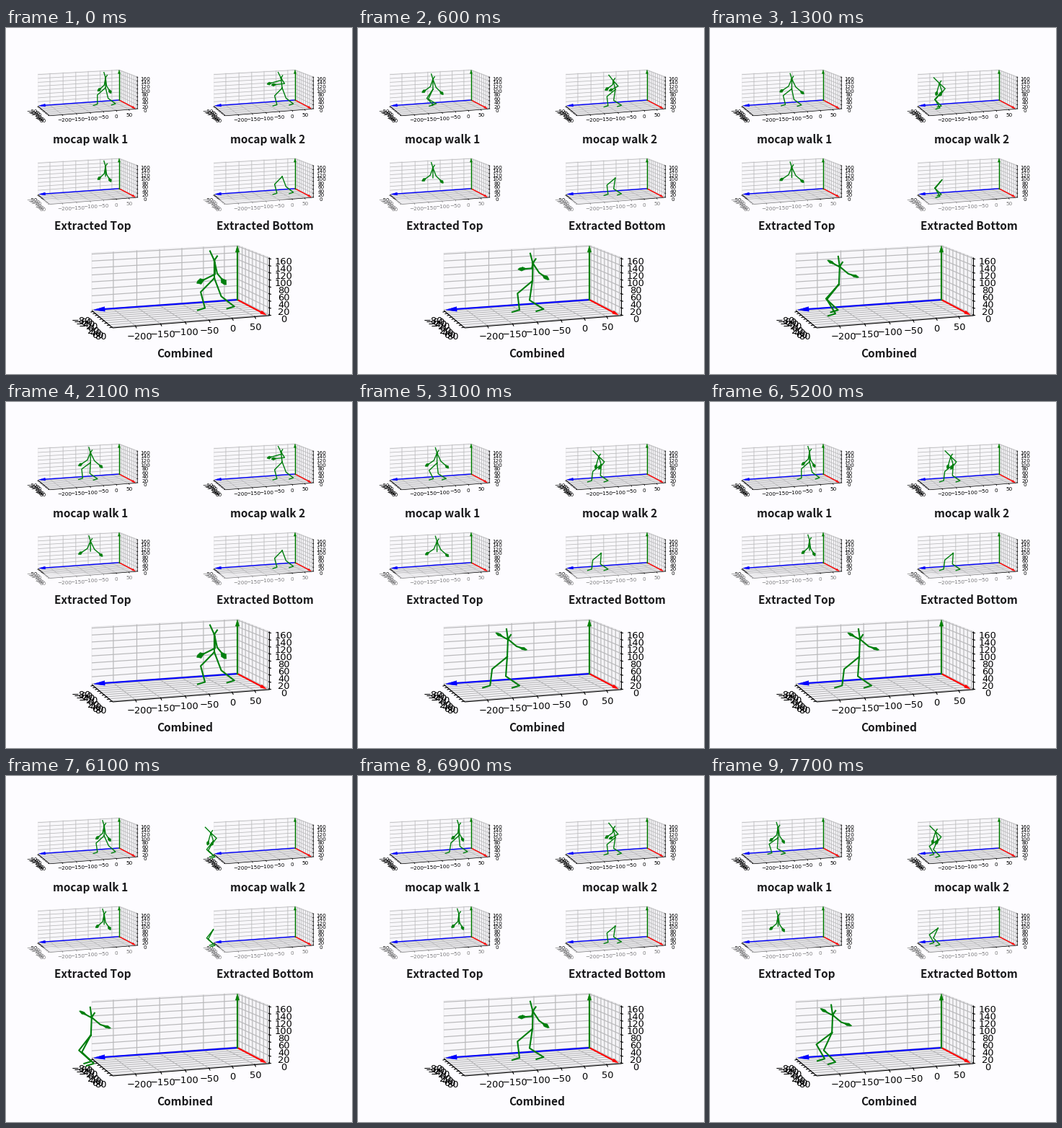
These frames come from a looping animation (480x480 px, 7800 ms). A matplotlib script:

```python
import numpy as np
import matplotlib.pyplot as plt
from matplotlib.animation import FuncAnimation
from matplotlib.collections import LineCollection
from matplotlib.patches import Polygon, Rectangle

SIZE, FRAMES, STEP_MS = 480, 78, 100
PX = 0.72  # points per pixel at 100 dpi
BG, GRID, GREEN = "#fdfcff", "#b9b9bb", "#007f0e"
SMALL = 0.558
ORIGIN = np.array([321.0, 377.0])

# Panels as (x, y, scale) of the axes' origin; all drawing uses the big panel's units.
BIG = (321, 377, 1.0)
WALK1, WALK2 = (157, 100, SMALL), (401, 100, SMALL)
TOP, BOTTOM = (157, 222.8, SMALL), (401, 222.8, SMALL)


def place(pt, panel):
    ox, oy, s = panel
    return np.array([ox, oy]) + (np.asarray(pt, float) - ORIGIN) * s


def mix(p, q, u):
    return p + (q - p) * u


# ---- axes -------------------------------------------------------------

fig = plt.figure(figsize=(SIZE / 100, SIZE / 100), dpi=100, facecolor=BG)
ax = fig.add_axes([0, 0, 1, 1])
ax.set_xlim(0, SIZE)
ax.set_ylim(SIZE, 0)
ax.axis("off")

BACK_L, BACK_R = np.array([119, 392]), np.array([321, 377])
FRONT_L, FRONT_R = np.array([148, 416]), np.array([365, 399])
TOP_L, TOP_R, TOP_F = np.array([119, 312]), np.array([321, 301]), np.array([365, 318])
PANES = [([BACK_L, BACK_R, TOP_R, TOP_L], "#f8f7fa"),
         ([BACK_R, FRONT_R, TOP_F, TOP_R], "#f5f4f7"),
         ([BACK_L, BACK_R, FRONT_R, FRONT_L], "#f6f5f8")]


def arrow(p, q, color, head, half, panel):
    d = (q - p) / np.hypot(*(q - p))
    n = np.array([-d[1], d[0]])
    base = q - d * head
    a, b = place(p, panel), place(base, panel)
    ax.plot([a[0], b[0]], [a[1], b[1]], color=color, lw=(0.5 + 1.6 * panel[2]) * PX, zorder=3)
    tri = [place(v, panel) for v in (q, base + n * half, base - n * half)]
    ax.add_patch(Polygon(tri, fc=color, ec=color, lw=0.4, zorder=3))


def draw_panel(panel):
    s = panel[2]
    for quad, color in PANES:
        ax.add_patch(Polygon([place(p, panel) for p in quad], fc=color, ec="#e4e3e6",
                             lw=0.5 * s, zorder=1))
    grid = []
    edges = [(BACK_L, FRONT_L), (FRONT_L, FRONT_R), (FRONT_R, TOP_F)]

    def label(value, x, y):
        x, y = place((x, y), panel)
        ax.text(x, y, str(value).replace("-", "\u2212"), family="DejaVu Sans",
                size=13 * s * PX, ha="center", va="center", color="black", zorder=3)

    for k in range(6):
        u = 0.148 + 0.1635 * k - 0.0022 * k * k
        back, front = mix(BACK_L, BACK_R, u), mix(FRONT_L, FRONT_R, u)
        grid.append((mix(TOP_L, TOP_R, u), back, front))
        edges.append((front + (-1, -1), front + (1, 3)))
        label(-200 + 50 * k, 185 + 32.3 * k, 428 - 2.55 * k)
    for k in range(9):
        r = k / 8
        v = 0.05 + 0.9 * r * (0.88 + 0.12 * r)
        left, right = mix(BACK_L, FRONT_L, v), mix(BACK_R, FRONT_R, v)
        grid.append((left, right, mix(TOP_R, TOP_F, v)))
        edges.append((left + (1, 0), left + (-3, 1)))
        label(-80 + 20 * k, 104 + 27 * r, 406 + 23 * r)
        h = 0.015 + 0.965 * r
        outer = mix(FRONT_R, TOP_F, h)
        grid.append((mix(BACK_L, TOP_L, h), mix(BACK_R, TOP_R, h), outer))
        edges.append((outer + (-1, 0), outer + (3, 1)))
        label(20 * k, 385.5, 404 - 79 * r)

    for lines, color, width, z in ((grid, GRID, 0.25 + 0.95 * s, 2),
                                   (edges, "black", 0.2 + 0.9 * s, 2.5)):
        segs = [[place(p, panel) for p in line] for line in lines]
        ax.add_collection(LineCollection(segs, colors=color, linewidths=width * PX, zorder=z))
    arrow(ORIGIN, np.array([122, 391]), "blue", 15, 3.2, panel)
    arrow(ORIGIN, np.array([361, 398]), "red", 8, 2.2, panel)
    arrow(ORIGIN, np.array([321, 302]), "green", 9, 2.6, panel)


# ---- motion -----------------------------------------------------------

THIGH, SHIN = 27, 23


def foot(cycle, start, stride, swing, ground):
    """Ankle that stands for half a cycle, then swings one stride ahead."""
    turn = np.floor(cycle)
    s = np.clip((cycle - turn - 0.5) / swing, 0, 1)
    return np.array([start - stride * (turn + s), ground - 4 * np.sin(np.pi * s)])


def knee(hip, ankle):
    """Two-bone joint that bends forward, to the left."""
    d = ankle - hip
    dist = np.hypot(*d)
    if dist >= THIGH + SHIN:
        return mix(hip, ankle, THIGH / (THIGH + SHIN))
    along = (THIGH ** 2 - SHIN ** 2 + dist ** 2) / (2 * dist)
    bend = np.sqrt(max(THIGH ** 2 - along ** 2, 0))
    return hip + (d * along + np.array([-d[1], d[0]]) * bend) / dist


def leg_chains(hip, feet):
    return [[hip, knee(hip, f), f, f + (-10, 3)] for f in feet]


def even_walk(t):
    """Hip and ankles of the first walk at sample t of 26."""
    c, ground = (t - 2) / 26, 387 + 0.15 * t
    hip = np.array([290.5 - 3.4 * t, 346 + 0.22 * t])
    return hip, [foot(c, 267, 85, 0.4, ground), foot(c + 0.5, 312, 85, 0.4, ground - 1)]


def stooped_walk(t):
    """Hip and ankles of the second walk at step t of 21."""
    c, ground = (t + 0.5) / 11, 388.5 + 0.6 * t
    hip = np.array([289 - 7.3 * t - 0.09 * t * t, 347 + 0.65 * t])
    return hip, [foot(c, 276, 102, 0.5, ground), foot(c + 0.5, 326, 102, 0.5, ground - 1)]


# Rows: neck from hip; then head, elbow, hand, elbow, hand from neck.
ARMS_LOW = np.array([(0, -24.5), (-6, -13), (1, 19), (-19, 29), (4, 18), (13, 29)])
ARMS_UP = np.array([(1, -24.5), (-2, -14), (-3, -1), (-12, -6), (12, 10), (21, 13)])
REACH = np.array([(-3, -25), (-7, -14), (2, 5), (-29, 14), (9, 14), (-18, 17)])
STOOP = np.array([(-6, -20), (-14, -14), (-4, 13), (-7, 25), (14, 13), (3, 27)])


def swing_arms(t):
    s = np.sin(np.pi * t / 26)
    a, b = np.array([-14 - 11 * s, 30]), np.array([9 + 17 * s, 34])
    return np.array([(0, -25), (-4, -13), a / 2 + (4.5, 3.5), a, b / 2 + (-3, 3.5), b])


def top_joints(hip, offsets):
    neck = hip + offsets[0]
    return [hip, neck, *(neck + o for o in offsets[1:])]


def top_chains(joints):
    hip, neck, head, elbow_a, hand_a, elbow_b, hand_b = joints
    return [[head, neck, hip], [neck, neck + (4, -6)],
            [neck, elbow_a, hand_a], [neck, elbow_b, hand_b]]


def hand_shape(elbow, hand, width):
    d = (hand - elbow) / np.hypot(*(hand - elbow))
    n = np.array([-d[1], d[0]])
    return [hand - d * 6, hand - d + n * width, hand + d * 4 + n * width * 0.6,
            hand + d * 6, hand + d - n * width]


class Walker:
    def __init__(self, panel, legs=True, top=True):
        self.panel, self.legs, self.top = panel, legs, top
        self.line, = ax.plot([], [], color=GREEN, lw=(0.5 + 1.6 * panel[2]) * PX,
                             solid_joinstyle="round", zorder=5)
        self.hands = [ax.add_patch(Polygon(np.zeros((3, 2)), fc=GREEN, ec=GREEN, lw=0.4, zorder=5))
                      for _ in range(2 if top else 0)]

    def show(self, hip, feet, offsets, grip=3.6):
        joints = top_joints(hip, offsets)
        chains = leg_chains(hip, feet) if self.legs else []
        if self.top:
            chains = chains + top_chains(joints)
        pts = np.vstack([row for c in chains for row in (*c, (np.nan, np.nan))])
        self.line.set_data(*place(pts, self.panel).T)
        for patch, i in zip(self.hands, (3, 5)):
            patch.set_xy(place(hand_shape(joints[i], joints[i + 1], grip), self.panel))


# ---- stage ------------------------------------------------------------

for panel in (WALK1, WALK2, TOP, BOTTOM, BIG):
    draw_panel(panel)

# The lower labels of the extracted panels are faded.
for x in (25, 269):
    ax.add_patch(Rectangle((x, 238), 155, 24, fc=BG, ec="none", alpha=0.5, zorder=4))

for text, x, y in (("mocap walk 1", 117.5, 160), ("mocap walk 2", 363, 160),
                   ("Extracted Top", 120, 280), ("Extracted Bottom", 359.5, 280),
                   ("Combined", 248, 457)):
    ax.text(x, y, text, family="Noto Sans CJK JP", weight="bold", size=15.4 * PX,
            ha="center", va="baseline", color="#1a1a1c", zorder=6)

walk1, walk2, combined = Walker(WALK1), Walker(WALK2), Walker(BIG)
top_only, legs_only = Walker(TOP, legs=False), Walker(BOTTOM, top=False)


def update(n):
    t1, t2 = (3 * n + 1) % 26, n % 21
    late = min(t2 / 10, 1)

    hip, feet = even_walk(t1)
    for walker in (walk1, top_only):
        walker.show(hip, feet, swing_arms(t1))

    hip, feet = stooped_walk(t2)
    for walker in (walk2, legs_only):
        walker.show(hip, feet, mix(REACH, STOOP, late))
    combined.show(hip, feet, mix(ARMS_LOW, ARMS_UP, late), grip=3.8 - 1.8 * late)
    return []


anim = FuncAnimation(fig, update, frames=FRAMES, interval=STEP_MS,
                     init_func=lambda: update(0), repeat=True, repeat_delay=0)
plt.show()
```
